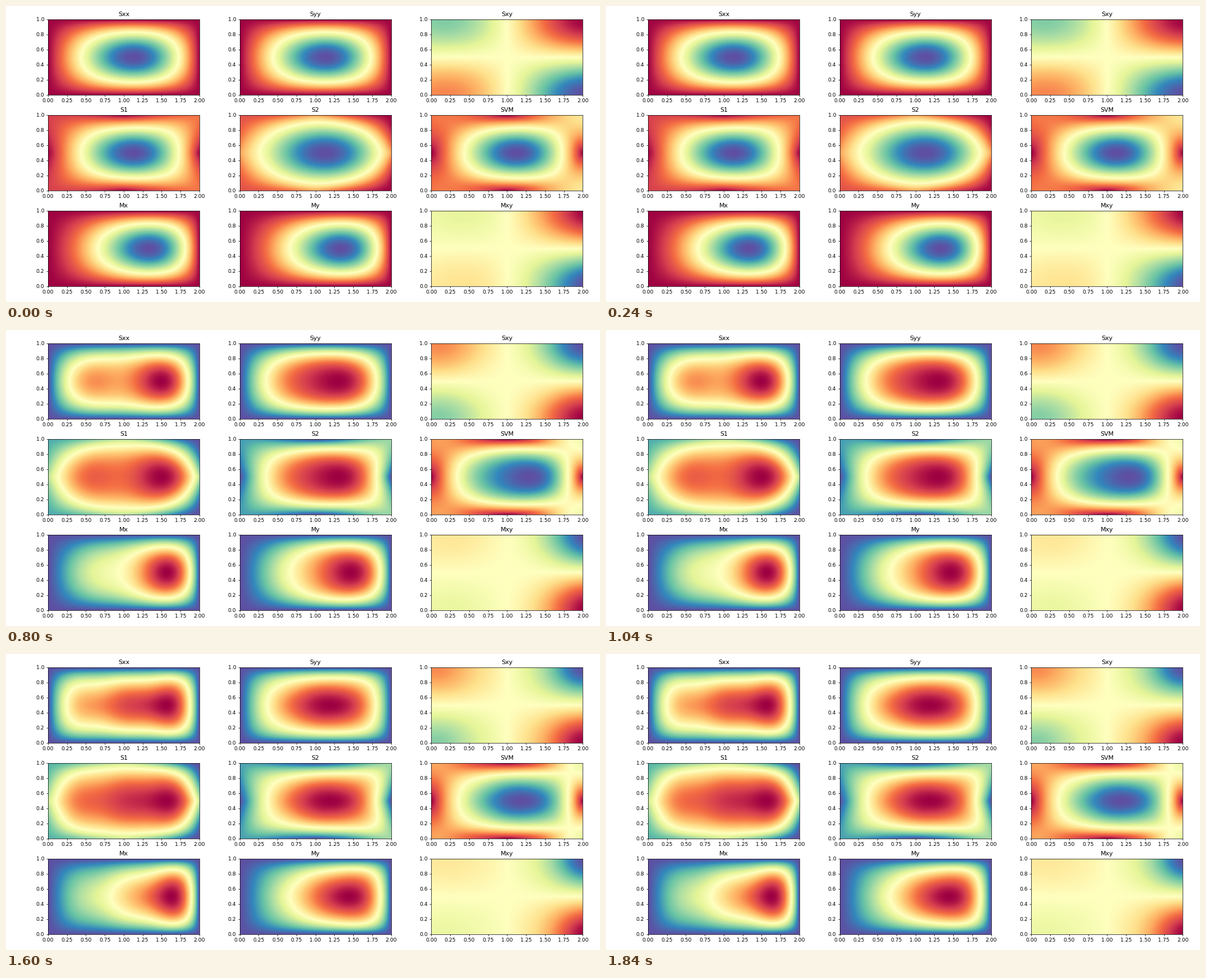
Write a matplotlib script that moves like this. It is 1059 by 529 pixels and loops after 2 s.

```python
import numpy as np
import matplotlib.pyplot as plt
from matplotlib.animation import FuncAnimation

W, H, DPI = 1059, 529, 64
SCALE = 66.2 / DPI
NU = 0.3
STEPS = 5
NAMES = ["Sxx", "Syy", "Sxy", "S1", "S2", "SVM", "Mx", "My", "Mxy"]

NX, NY = 540, 270
x, y = np.meshgrid(np.linspace(0, 2, NX), np.linspace(0, 1, NY))
thick = 1 + x / 2


def plate_fields(step):
    """Stresses and moments of a tapered, simply supported plate.

    The odd wave numbers grow by one every second step; on the first
    step of each pair the highest mode enters with the opposite sign.
    """
    waves = range(1, step // 2 * 2 + 2, 2)
    top = waves[-1]
    kx, ky, kxy = (np.zeros_like(x) for _ in range(3))
    for m in waves:
        for n in waves:
            a, b = m * np.pi / 2, n * np.pi
            amp = -1 / (m * n * (m**2 / 4 + n**2) ** 2)
            if step % 2 == 0 and m == n == top:
                amp = -amp
            bump = amp * np.sin(a * x) * np.sin(b * y)
            kx += a**2 * bump
            ky += b**2 * bump
            kxy -= amp * a * b * np.cos(a * x) * np.cos(b * y)
    bend_x = kx + NU * ky
    bend_y = ky + NU * kx
    twist = (1 - NU) / 2 * kxy

    sx, sy, sxy = (thick * f for f in (bend_x, bend_y, twist))
    mean = (sx + sy) / 2
    radius = np.hypot((sx - sy) / 2, sxy)
    mises = np.sqrt(sx**2 + sy**2 - sx * sy + 3 * sxy**2)
    moments = [thick**3 * f for f in (bend_x, bend_y, twist)]
    return [sx, sy, sxy, mean + radius, mean - radius, mises, *moments]


plt.rcParams.update({
    "font.family": "DejaVu Sans",
    "font.size": 10 * SCALE,
    "axes.linewidth": 0.8 * SCALE,
    "axes.titlepad": 6 * SCALE,
})
for axis in ("xtick", "ytick"):
    plt.rcParams.update({
        f"{axis}.major.size": 3.5 * SCALE,
        f"{axis}.major.width": 0.8 * SCALE,
        f"{axis}.major.pad": 3.5 * SCALE,
    })

fig = plt.figure(figsize=(W / DPI, H / DPI), dpi=DPI, facecolor="white")
images = []
for i, name in enumerate(NAMES):
    row, col = divmod(i, 3)
    left = 74.9 + 341.7 * col
    bottom = H - (158.8 + 171 * row)
    ax = fig.add_axes([left / W, bottom / H, 270 / W, 135 / H])
    images.append(ax.imshow(np.zeros((NY, NX)), cmap="Spectral", origin="lower",
                            extent=(0, 2, 0, 1), aspect="auto",
                            interpolation="bilinear"))
    ax.set_xticks(np.linspace(0, 2, 9))
    ax.set_yticks(np.linspace(0, 1, 6))
    ax.set_title(name)


def draw(step):
    for image, field in zip(images, plate_fields(step)):
        image.set_data(field)
        image.set_clim(field.min(), field.max())
    return images


anim = FuncAnimation(fig, draw, frames=STEPS, interval=400,
                     repeat=True, repeat_delay=0, blit=False)
plt.show()
```
